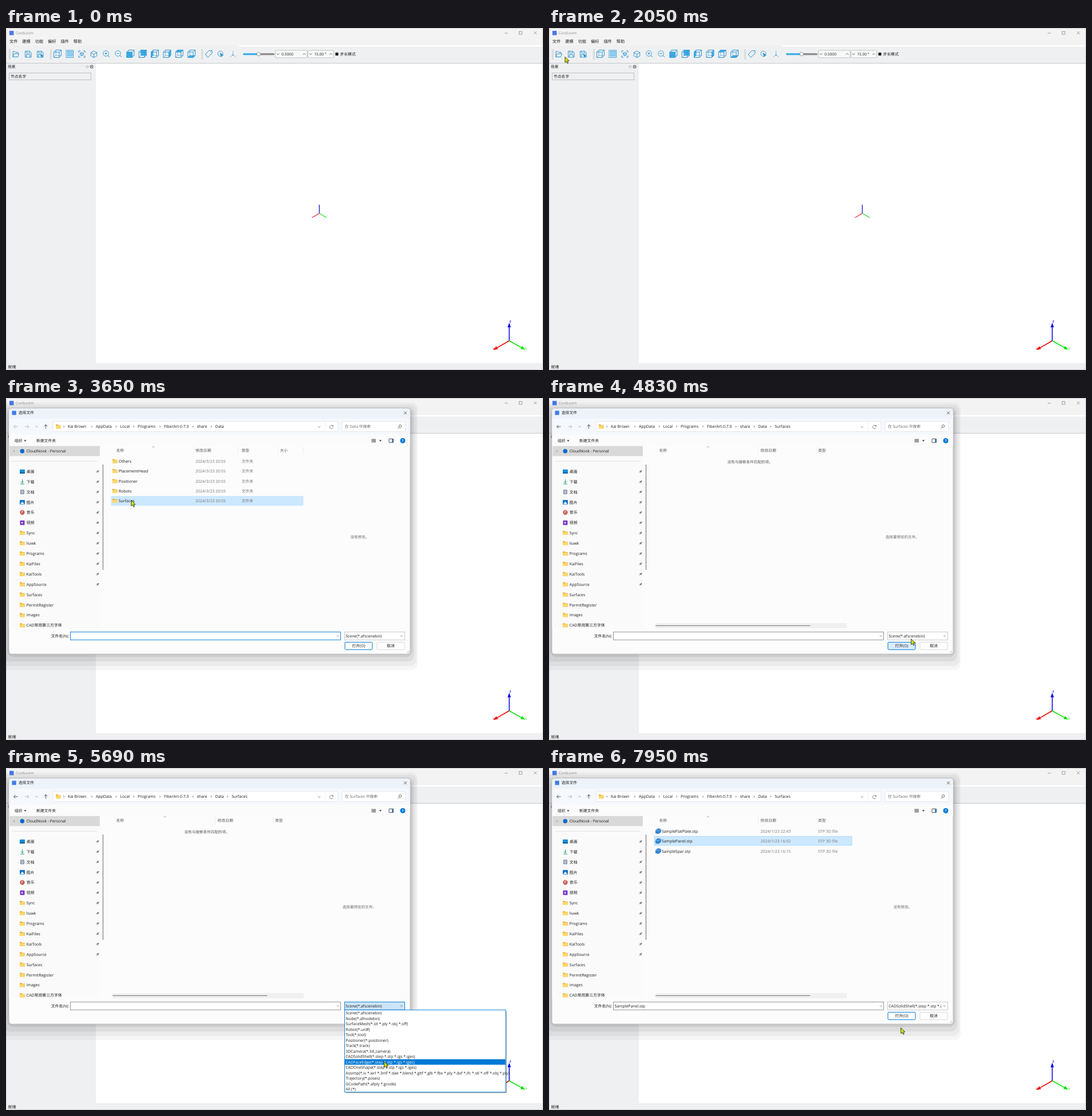
Animation of 938x597 px, one loop 8 s. Source, as an HTML page:

```html
<!DOCTYPE html>
<html lang="zh-CN">
<head>
<meta charset="utf-8">
<title>File dialog demo</title>
<style>
html, body { margin: 0; width: 100%; height: 100%; overflow: hidden; background: #eff0f1; }
svg { display: block; width: 938px; height: 597px; }
text { font-family: "Open Sans", "Noto Sans CJK SC", "Noto Sans CJK", sans-serif; text-rendering: geometricPrecision; white-space: pre; }
</style>
</head>
<body>
<svg id="stage" viewBox="0 0 938 597" xmlns="http://www.w3.org/2000/svg"></svg>
<script>
const BLUE = '#2a93d1', SKY = '#3daee9', ACCENT = '#0078d4', INK = '#1b1b1b', MUTED = '#777';
const LOOP = 8000;

// y is the vertical middle of the line
const text = (x, y, s, size = 7, fill = INK, extra = '') =>
  `<text x="${x}" y="${y + size * .36}" font-size="${size}" fill="${fill}" ${extra}>${s}</text>`;
const rect = (x, y, w, h, fill, stroke = 'none', rx = 0, extra = '') =>
  `<rect x="${x}" y="${y}" width="${w}" height="${h}" fill="${fill}" stroke="${stroke}" rx="${rx}" ${extra}/>`;
const path = (d, stroke = INK, w = .8, fill = 'none') =>
  `<path d="${d}" stroke="${stroke}" stroke-width="${w}" fill="${fill}"/>`;
const disc = (x, y, r, fill, stroke = 'none', w = .9) =>
  `<circle cx="${x}" cy="${y}" r="${r}" fill="${fill}" stroke="${stroke}" stroke-width="${w}"/>`;
const group = (id, body) => `<g id="${id}">${body}</g>`;
const chevron = (x, y, dir, c = '#444', s = 2.4) => path({
  down: `M${x - s} ${y - s / 2}l${s} ${s} ${s} ${-s}`,
  up: `M${x - s} ${y + s / 2}l${s} ${-s} ${s} ${s}`,
  right: `M${x - s / 2} ${y - s}l${s} ${s} ${-s} ${s}`
}[dir], c);
const cross = (x, y, s, c = '#444') => path(`M${x - s} ${y - s}l${2 * s} ${2 * s}m0 ${-2 * s}l${-2 * s} ${2 * s}`, c, .7);
const caretDown = (x, y) => path(`M${x - 2.2} ${y - 1}h4.4l-2.2 2.4z`, 'none', 0, '#333');
const folder = (x, y) => path(`M${x} ${y - 3.5}h3l1 1.2h4.5v5.8h-8.5z`, 'none', 0, '#e8a92c') +
  rect(x, y - 1.6, 8.5, 5, '#ffd86b', 'none', .6);

/* ---------- main window ---------- */
function cube(cx, face) {
  const x = cx - 6.5, y = 42, s = 9.5, k = 3.5;
  const fills = {
    front: `M${x} ${y}h${s}v${s}h${-s}z`,
    back: `M${x + k} ${y - k}h${s}v${s}h${-s}z`,
    left: `M${x} ${y}l${k} ${-k}v${s}l${-k} ${k}z`,
    right: `M${x + s} ${y}l${k} ${-k}v${s}l${-k} ${k}z`,
    top: `M${x} ${y}l${k} ${-k}h${s}l${-k} ${k}z`,
    bottom: `M${x} ${y + s}l${k} ${-k}h${s}l${-k} ${k}z`
  };
  return (fills[face] ? path(fills[face], 'none', 0, SKY) : '') +
    path(`M${x + k} ${y - k}v${s}h${s}M${x + k} ${y + s - k}l${-k} ${k}`, BLUE, .6) +
    path(`M${x} ${y}h${s}v${s}h${-s}zl${k} ${-k}h${s}v${s}l${-k} ${k}M${x + s} ${y}l${k} ${-k}`, BLUE, .95);
}
const isoCube = (x, y, r) => path(
  `M${x} ${y - r}l${r * .9} ${r / 2}v${r}l${-r * .9} ${r / 2}l${-r * .9} ${-r / 2}v${-r}zM${x - r * .9} ${y - r / 2}l${r * .9} ${r / 2}l${r * .9} ${-r / 2}M${x} ${y}v${r}`, BLUE, .95);
const zoom = (x, plus) => disc(x - .5, 44.5, 4.8, 'none', BLUE) +
  path(`M${x + 3} 48l3 3M${x - 2.7} 44.5h4.4${plus ? 'm-2.2 -2.2v4.4' : ''}`, BLUE, 1);
const floppy = x => path(`M${x - 5} 40.5h8l2.5 2.5v8h-10.5zM${x - 2.5} 40.5v3.5h5v-3.5M${x - 3} 51v-4.5h6.5v4.5`, BLUE, .95);
const handle = x => path(`M${x} 37v18m2 -18v18`, '#c4c7c9', .8);

function toolbar() {
  let s = [5.5, 77.5, 341.5].map(handle).join('');
  s += path('M12 50.5v-9.5h3.5l1.5 1.5h4v2M12 50.5l2.2 -5.5h8.5l-2.2 5.5z', BLUE, 1);
  s += floppy(38.5) + floppy(59.5) + path('M60 46l5 2.5-2 .8-.8 2z', BLUE, .8, BLUE);
  s += cube(90) + rect(105, 39, 12.5, 12.5, '#fff', BLUE, 0, 'stroke-width=".9"') + rect(107, 40.5, 9, 9, '#8fcdf0', BLUE, 0, 'stroke-width=".5"');
  s += path('M127 43v-3h3M135 40h3v3M138 48v3h-3M130 51h-3v-3', BLUE, 1) + isoCube(132.5, 45.5, 3.2) + isoCube(153.5, 45.8, 5.8);
  s += zoom(175, true) + zoom(196, false);
  ['front', 'back', 'left', 'right', 'top', 'bottom'].forEach((f, i) => s += cube(217.3 + i * 21.35, f));
  s += path('M348 46l6.5 -6.5h5.5v4.5l-7.5 7.5z', BLUE, 1) + disc(357.8, 41.6, .6, BLUE);
  s += disc(374.5, 44.8, 4.5, 'none', BLUE) + path('M374 43.5l5.5 4-2.5 .6-1 2.4z', BLUE, .8, BLUE);
  s += path('M396.5 40v7l-5 3.5M396.5 47l5 3.5', '#6db7de', .9) + disc(396.5, 47, 1.1, BLUE);
  s += rect(414, 44, 27, 3.2, SKY, 'none', 1.5) + rect(441, 44, 28, 3.2, '#8b8d8f', 'none', 1.5) + disc(441.3, 45.6, 3.2, '#fafafa', '#777', .7);
  for (const [x, w, label] of [[470.5, 55.5, '0.5000'], [527.5, 45, '15.00 °']])
    s += rect(x, 39, w, 13, '#f7f8f8', '#b4b8ba', 1, 'stroke-width=".8"') + chevron(x + 4.6, 45.5, 'down') + text(x + 10.8, 45.6, label, 6.6) + chevron(x + w - 5, 45.5, 'up');
  return s + rect(575.4, 43, 5, 5, '#111', '#888', .5, 'stroke-width=".6"') + text(583.5, 45.6, '步长模式', 6.8);
}

function arrowAxis(x, y, dx, dy, c) {
  const n = Math.hypot(dx, dy), ux = dx / n, uy = dy / n, bx = x + dx - ux * 8, by = y + dy - uy * 8;
  return path(`M${x} ${y}L${bx} ${by}`, c, 1.5) +
    path(`M${x + dx} ${y + dy}L${bx - uy * 2.9} ${by + ux * 2.9}L${bx + uy * 2.9} ${by - ux * 2.9}z`, 'none', 0, c);
}

function mainWindow() {
  let s = rect(0, 0, 938, 17, '#f3f3f3') + rect(0, 17, 938, 580, '#eff0f1');
  s += rect(0, 17, 938, 13.5, '#f3f3f4') + rect(407, 30, 531, 2.2, '#fff');
  s += rect(6, 5, 7.5, 7.5, '#4a78e8') + text(17, 8.8, 'CordLoom', 6.4, '#8a8a8a');
  s += path('M871 9h5.5', '#777', .7) + rect(896.2, 6, 5, 5, 'none', '#777', 0, 'stroke-width=".7"') + cross(924.5, 8.5, 2.5, '#777');
  ['文件', '建模', '功能', '偏好', '插件', '帮助'].forEach((m, i) => s += text(6 + i * 22.35, 23.5, m, 7.2));
  s += toolbar() + rect(0, 61, 938, .8, '#b9bcbe');
  s += text(3, 68, '场景', 6.8) + path('M141.8 65.3l2.3 2.3-2.3 2.3-2.3-2.3z', '#777', .6) + disc(149.6, 67.6, 2.6, 'none', '#333', .8) + cross(149.6, 67.6, 1.2, '#222');
  s += rect(5.5, 78.5, 143, 12, '#eff0f1', '#b9bcbe', 0, 'stroke-width=".9"') + text(8, 84.6, '节点名字', 6.8);
  s += rect(157, 62, 781, 523, '#fff');
  s += path('M547.3 323.5V308.5', '#1414b8', 1.3) + path('M547.3 323.5L534.5 331', '#e8203a', 1.2) + path('M547.3 323.5L560 331', '#22e022', 1.2);
  s += arrowAxis(879, 546, 0, -31.5, '#0000e6') + arrowAxis(879, 546, -28, 16, '#f00000') + arrowAxis(879, 546, 28, 15.5, '#00e400');
  s += text(879.3, 511.3, 'z', 6.5, '#0000ff', 'font-weight="600"') + text(906.8, 560, 'Y', 6, '#00e400') + text(850.5, 559, 'x', 5.5, '#f00000');
  s += text(3.5, 591.5, '就绪', 7, INK, 'font-weight="500"');
  return s + rect(.3, .3, 937.2, 596.4, 'none', '#b5b5b5', 4, 'stroke-width=".7"');
}

/* ---------- dialog ---------- */
const places = ['桌面', '下载', '文档', '图片', '音乐', '视频', 'Sync', 'liuwk', 'Programs', 'KaiFiles', 'KaiTools',
  'AppSource', 'Surfaces', 'PermitRegister', 'images', 'CAD常用第三方字体'];
const placeIcons = [
  y => rect(24, y - 3.5, 9, 7, '#1a8fd8', 'none', .8) + rect(24, y + 1.5, 9, 2, '#0d5f9c'),
  y => path(`M28.5 ${y - 4}v6m-2.6 -2.4l2.6 2.6 2.6 -2.6M25 ${y + 4}h7`, '#18a06a', 1),
  y => rect(25, y - 4, 7, 8, '#8d9cae', 'none', .8) + path(`M26.5 ${y - 1.8}h4m-4 1.9h4m-4 1.9h4`, '#fff', .6),
  y => rect(24, y - 3.8, 9, 7.6, '#1a75c9', 'none', .8) + path(`M25 ${y + 3}l3.5 -3.8 3.5 3.8z`, 'none', 0, '#fff'),
  y => disc(28.5, y, 4.2, '#c9605a') + path(`M27.7 ${y + 1.6}v-3.6l2.4 -.6`, '#fff', .8),
  y => rect(24.5, y - 4, 8, 8, '#7a3bc8', 'none', .8) + path(`M27.2 ${y - 1.7}l3 1.7-3 1.7z`, 'none', 0, '#fff')
];
const pin = (x, y) => path(`M${x - 2.3} ${y + 2.5}l1.8 -1.8`, '#777', .7) + path(`M${x - 1.8} ${y - .6}l2.3 -.3 1 -1.6 1.8 1.8-1.6 1-.3 2.3z`, 'none', 0, '#777');
const crumbs = [['Kai Brown', 108], ['AppData', 157], ['Local', 199.5], ['Programs', 230], ['FiberArt-0.7.0', 276], ['share', 333.5], ['Data', 365.5]];
const rowY = i => 110.2 + i * 17.35;
const stpIcon = (x, y) => path(`M${x} ${y - 1.5}l4 -3 5 1v5l-4 3-5 -1z`, '#0e4f94', .5, '#2f86d8') + path(`M${x} ${y - 1.5}l5 1 4 -3`, '#bfe0fa', .6);
const header = (cols, caretX, lines) => cols.map(([s, x]) => text(x, 91.3, s, 6.8, '#555')).join('') +
  chevron(caretX, 85.3, 'up', '#777', 1.8) + lines.map(x => rect(x, 85, .6, 13, '#e6e6e6')).join('');

function dataView() {
  let s = chevronsAndSearch('Data') + header([['名称', 192.5], ['修改日期', 331], ['类型', 411.5], ['大小', 478.5]], 257.7, [327, 405, 474, 519]);
  s += rect(183.5, rowY(4) - 8.6, 336, 17, '#e5f3ff', 'none', 0, 'id="folderRow"');
  ['Others', 'PlacementHead', 'Positioner', 'Robots', 'Surfaces'].forEach((n, i) => {
    const y = rowY(i);
    s += folder(186, y) + text(196.7, y + .3, n, 7) + text(331, y + .3, '2024/3/23 20:55', 7, MUTED) + text(411.5, y + .3, '文件夹', 6.8, MUTED);
  });
  return s;
}
function chevronsAndSearch(dir) {
  return text(592, 50, `在 ${dir} 中搜索`, 6.7, '#666') + path('M20.5 50h-7m3 -3l-3 3 3 3', dir === 'Data' ? '#aaa' : '#333', .8);
}
function surfacesView() {
  let s = chevronsAndSearch('Surfaces') + chevron(387, 49.8, 'right', '#444', 1.5) + text(394.3, 49.9, 'Surfaces', 6.9);
  s += header([['名称', 192.5], ['修改日期', 369.5], ['类型', 470]], 277.5, [365.5, 467]);
  s += rect(186, 393, 334, 9, '#f0f0f0') + rect(186, 396.8, 270.5, 1.3, '#858585', 'none', .6);
  s += group('empty', text(311.5, 112, '没有与搜索条件匹配的项。', 6.6, '#555'));
  let files = rect(184, rowY(1) - 8.3, 345, 15.8, '#cce8ff', '#99d1ff', 0, 'id="fileRow" stroke-width=".7"');
  [['SampleFlatPlate', '22:43'], ['SamplePanel', '16:02'], ['SampleSpar', '16:15']].forEach(([n, h], i) => {
    const y = rowY(i);
    files += stpIcon(186.3, y) + text(197, y + .2, n + '.stp', 6.9) + text(369.5, y + .2, '2024/1/23 ' + h, 7, MUTED) + text(470, y + .2, 'STP 3D file', 7, MUTED);
  });
  return s + group('files', files);
}

function dialog() {
  let s = [[-20, 8, 739, 467, .035], [-15, 12, 732, 456, .045], [-5, 16, 718, 444, .06], [2, 18, 708, 434, .08]]
    .map(([x, y, w, h, a]) => rect(x, y, w, h, '#000', 'none', 11, `opacity="${a}"`)).join('');
  s += rect(5, 18, 701, 429, '#fcfcfc', '#a9adb2', 4.5, 'stroke-width=".8"') + rect(5.4, 18.4, 700.2, 17.6, '#eef3fa', 'none', 4);
  s += rect(5.4, 30, 700.2, 34, '#f5f8fc') + rect(5.4, 30, 700.2, 6, '#eef3fa') + rect(5.4, 64, 700.2, 20, '#fbfbfc');
  s += rect(10.5, 22.3, 7.3, 7.3, '#3f7de8') + text(21.8, 26, '选择文件', 6.8) + cross(697.5, 26, 2.5, '#222');
  s += path('M33 50h7m-3 -3l3 3-3 3', '#aaa') + chevron(53.5, 50, 'down', '#888', 1.8) + path('M69.5 53.5v-7m-3 3l3 -3 3 3', '#333');
  s += rect(82, 41, 498, 17.5, '#fff', '#e0e3e7', 1, 'stroke-width=".8"') + folder(87, 49.8);
  for (const [label, x] of crumbs) s += chevron(x - 7, 49.8, 'right', '#444', 1.5) + text(x, 49.9, label, 6.9);
  s += chevron(547, 50.5, 'down', '#666', 2) + rect(557, 41.5, .6, 16.5, '#e6e6e6') + path('M571 49a3 3 0 1 0 .2 2.6M571.4 47v2.3h-2.3', '#555', .7);
  s += rect(587, 41, 111, 17.5, '#fff', '#e0e3e7', 1, 'stroke-width=".8"') + disc(688.6, 49, 2.2, 'none', '#444', .8) + path('M687 50.8l-2.4 2.6', '#444');
  s += text(15, 74.7, '组织', 6.8) + caretDown(33.5, 74.5) + text(53, 74.7, '新建文件夹', 6.8);
  s += path('M638.5 72.3h7.5m-7.5 2.2h7.5m-7.5 2.2h7.5', '#333', 1) + caretDown(654, 74.5);
  s += rect(669, 71.3, 7.8, 6.4, '#fff', '#222', .5, 'stroke-width=".8"') + rect(674, 71.5, 2.6, 6, '#3a7fc0') + disc(693, 74.5, 4.5, ACCENT) + text(691.4, 74.5, '?', 6.5, '#fff', 'font-weight="700"');
  // sidebar
  s += rect(5.4, 84, 159.6, 318, '#fafafa') + rect(6.3, 83.8, 157.6, 17.6, '#d9d9d9', 'none', 0, 'id="cloudRow" stroke-width=".7"');
  s += chevron(14, 92.8, 'right', '#777', 1.8) + disc(28.3, 92.8, 3.8, '#0a6cc9') + text(35.8, 93, 'CloudNook - Personal', 6.8);
  s += rect(10.5, 110.3, 149, .7, '#d8d8d8');
  places.forEach((p, i) => {
    const y = 128.2 + i * 17.9;
    s += (placeIcons[i] || (v => folder(24.2, v)))(y) + text(35.8, y + .2, p, 6.9) + (i < 12 ? pin(159.5, y) : '');
  });
  s += rect(168.8, 116, 1.3, 184, '#858585', 'none', .6);
  s += group('data', dataView()) + group('surfaces', surfacesView());
  s += group('pickHint', text(587.8, 243, '选择要预览的文件。', 6.55, '#666')) + group('noPreview', text(601.5, 243, '没有预览。', 6.55, '#666'));
  // footer
  s += text(110, 415.2, '文件名(N):', 6.8, INK, 'text-anchor="end"') + rect(112.5, 408.4, 472, 13.8, '#fff', '#8a8a8a', 0, 'id="nameBox" stroke-width=".9"');
  s += group('caret', rect(114.8, 410.5, .8, 9.5, '#000')) + group('fileName', text(114.5, 415.4, 'SamplePanel.stp', 6.9)) + chevron(579.7, 415.5, 'down', '#666', 1.8);
  s += rect(591.5, 408.4, 105, 13.8, '#fff', '#c4c4c4', 0, 'id="combo" stroke-width=".9"') + chevron(691, 415.5, 'down', '#555', 1.8);
  s += '<clipPath id="clip"><rect x="592" y="408" width="94" height="14"/></clipPath><g clip-path="url(#clip)">' +
    group('typeScene', text(593.3, 415.3, 'Scene(*.afscenebin)', 6.85)) + group('typeSolid', text(593.3, 415.3, 'CADSolidShell(*.step *.stp *.igs *.iges)', 6.85)) + '</g>';
  s += rect(592, 426.3, 48, 13, '#fdfdfd', ACCENT, 1.8, 'id="openBtn" stroke-width="1"') + text(616, 432.8, '打开(O)', 6.8, INK, 'text-anchor="middle"');
  s += rect(648, 426.3, 48, 13, '#fdfdfd', '#d0d0d0', 1.8, 'stroke-width=".8"') + text(672, 432.8, '取消', 6.8, INK, 'text-anchor="middle"');
  return s + path('M704 441l-4 4m4 -2l-2 2', '#aaa', .7);
}

/* ---------- type list ---------- */
const types = ['Scene(*.afscenebin)', 'Node(*.afnodebin)', 'SurfaceMesh(*.stl *.ply *.obj *.off)', 'Robot(*.urdf)', 'Tool(*.tool)',
  'Positioner(*.positioner)', 'Track(*.track)', '3DCamera(*.3d_camera)', 'CADSolidShell(*.step *.stp *.igs *.iges)',
  'CADFaceEdge(*.step *.stp *.igs *.iges)', 'CADOneShape(*.step *.stp *.igs *.iges)',
  'Assimp(*.iv *.wrl *.3mf *.dae *.blend *.gltf *.glb *.fbx *.ply *.dxf *.ifc *.stl *.off *.obj *.ply)',
  'Trajectory(*.poses)', 'GCodePath(*.afply *.gcode)', 'All (*)'];
const LIST_Y = 422.8, PITCH = 9.51;
const typeList = () => rect(593.5, 424.5, 281, 143, '#777', 'none', 0, 'opacity=".6"') +
  rect(591.5, 422.3, 281.5, 143.5, '#fff', ACCENT, 0, 'stroke-width=".9"') +
  rect(592, LIST_Y, 280.5, PITCH, ACCENT, 'none', 0, 'id="pickRow"') +
  types.map((s, i) => text(593.3, LIST_Y + PITCH * (i + .5), s, 6.85, INK, 'class="type"')).join('');

const pointer = group('arrow', path('M0 0V10L2.3 8 4.1 11.6 5.7 10.8 4 7.3H7.2Z', '#222', .8, '#d6e600')) +
  group('hand', path('M.5 1.2C1 .2 2.2 .6 2.6 1.6L4 4 7 4.2C8.4 4.6 8.6 6 8.2 8L7.4 10.8H3.4L.6 7.4C.2 6.4 1.2 6 2.2 6.8z', '#222', .8, '#d6e600'));

document.getElementById('stage').innerHTML =
  mainWindow() + group('dialog', dialog()) + group('list', typeList()) + group('pointer', pointer);

/* ---------- motion ---------- */
const track = [
  [140, 655, 600], [940, 68, 103], [990, 68, 103], [1120, 47, 84], [1320, 47, 84], [1720, 3, 44], [2050, 28, 50.3],
  [2110, 28, 50.3], [2250, 15, 46], [2420, 15, 46], [2860, 81, 92], [3140, 222, 177], [3320, 222, 177], [4090, 214, 181],
  [4230, 214, 181], [4660, 624, 434], [4720, 624, 434], [4830, 632.5, 420.5], [4990, 647, 413], [5180, 647, 413],
  [5690, 660.5, 512.5], [5840, 661, 519], [5990, 661, 519], [6220, 656.3, 504.3], [6680, 656.3, 504.3], [7390, 236, 128],
  [7540, 236, 128], [7950, 614.7, 453.5]
];
const $ = id => document.getElementById(id);
const ids = ['dialog', 'data', 'surfaces', 'empty', 'files', 'pickHint', 'noPreview', 'caret', 'fileName', 'combo', 'typeScene', 'typeSolid',
  'openBtn', 'nameBox', 'cloudRow', 'folderRow', 'fileRow', 'list', 'pickRow', 'pointer', 'arrow', 'hand'];
const el = Object.fromEntries(ids.map(id => [id, $(id)]));
const rows = [...document.querySelectorAll('.type')];
const show = (id, on) => el[id].style.display = on ? '' : 'none';
const paint = (id, fill, stroke) => { el[id].setAttribute('fill', fill); if (stroke) el[id].setAttribute('stroke', stroke); };
const clamp = (v, a, b) => Math.min(b, Math.max(a, v));

function pointerAt(t) {
  const i = track.findIndex(k => k[0] > t);
  if (i === 0) return track[0].slice(1);
  if (i < 0) return track[track.length - 1].slice(1);
  const [t0, x0, y0] = track[i - 1], [t1, x1, y1] = track[i];
  const p = (t - t0) / (t1 - t0), e = p * p * (3 - 2 * p);
  return [x0 + (x1 - x0) * e, y0 + (y1 - y0) * e];
}

function draw(t) {
  const [x, y] = pointerAt(t);
  const over = (a, b, c, d) => x >= a && x <= c && y >= b && y <= d;
  const between = (a, b) => t >= a && t < b;
  el.pointer.setAttribute('transform', `translate(${x} ${y})`);

  // the dialog grows in about a fixed point
  const p = clamp((t - 2730) / 300, 0, 1), k = 1 - .1 * (1 - p) ** 3;
  show('dialog', t >= 2730);
  el.dialog.setAttribute('transform', `translate(167 124) scale(${k}) translate(-167 -124)`);
  el.dialog.setAttribute('opacity', clamp((t - 2720) / 90, 0, 1));

  const onCloud = t >= 2730 && over(6, 83, 164, 101.5);
  paint('cloudRow', onCloud ? '#cce8ff' : '#d9d9d9', onCloud ? '#99d1ff' : 'none');
  show('hand', onCloud && t < 3000);
  show('arrow', !(onCloud && t < 3000));

  show('data', t < 4200);
  show('surfaces', t >= 4200);
  show('folderRow', t >= 3400 || over(183, 171, 520, 188));
  paint('folderRow', t >= 3400 ? '#cce8ff' : '#e5f3ff');
  const noPreview = between(3400, 4200) || t >= 7500;
  show('noPreview', noPreview);
  show('pickHint', !noPreview);

  show('empty', t < 6750);
  show('files', t >= 6750);
  const picked = t >= 7500;
  show('fileRow', picked || over(184, 119, 529, 135));
  paint('fileRow', picked ? '#cce8ff' : '#e5f3ff', picked ? '#99d1ff' : 'none');
  show('fileName', picked);
  show('caret', t < 3400 && (t - 2730) % 1000 < 500);
  paint('nameBox', '#fff', t < 4200 ? ACCENT : '#8a8a8a');
  paint('openBtn', between(4560, 4880) ? '#d9ecfb' : '#fdfdfd');

  const active = between(4900, 7500);
  paint('combo', active ? '#cce4f7' : '#fff', active ? ACCENT : '#c4c4c4');
  show('typeScene', t < 6600);
  show('typeSolid', t >= 6600);

  show('list', between(5100, 6600));
  const n = clamp(Math.floor((y - LIST_Y) / PITCH), 0, types.length - 1);
  el.pickRow.setAttribute('y', LIST_Y + n * PITCH);
  rows.forEach((r, i) => r.setAttribute('fill', i === n ? '#fff' : INK));
}

const start = performance.now();
function tick() {
  draw((performance.now() - start) % LOOP);
  requestAnimationFrame(tick);
}
tick();
</script>
</body>
</html>
```
